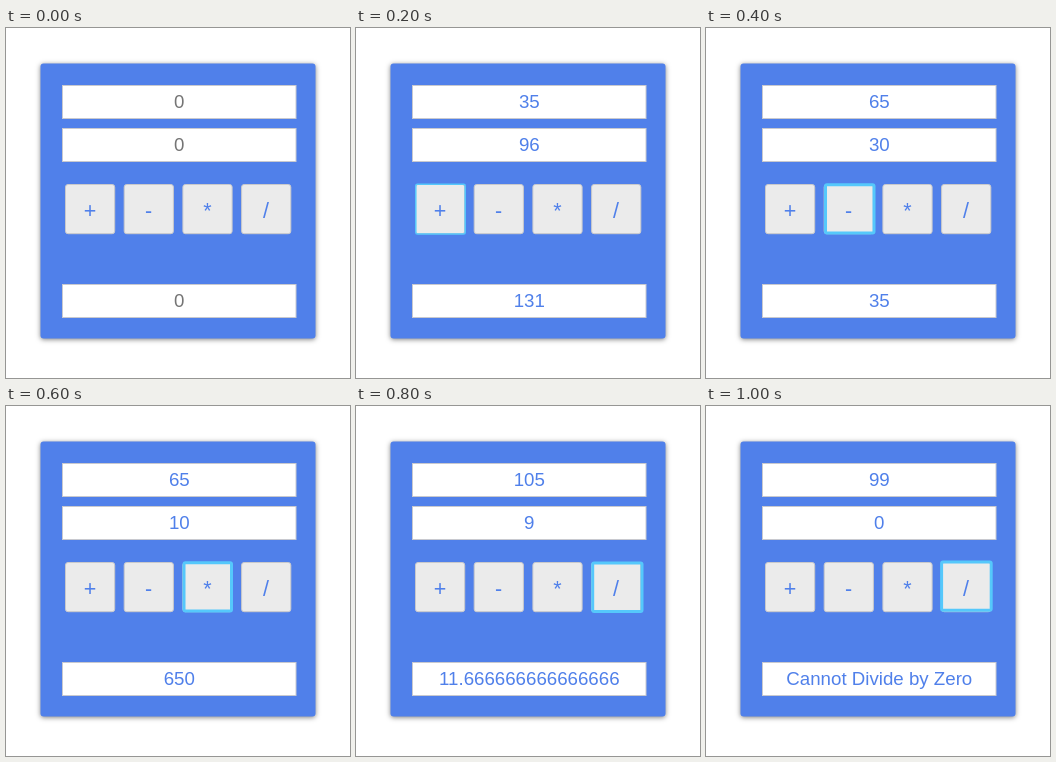
Recreate the animation shown at these times as an HTML page. Size 344 by 350 pixels, loop 1.2 s.

```html
<!DOCTYPE html>
<html lang="en">
<head>
<meta charset="utf-8">
<title>Calculator</title>
<style>
html, body { margin: 0; width: 100%; height: 100%; overflow: hidden; background: #fff; }
svg { display: block; width: 100vw; height: 100vh; }
text { font-family: "Liberation Sans", Arial, sans-serif; text-anchor: middle; fill: #5080ea; }
.field { font-size: 18.7px; }
.key { font-size: 21.5px; }
.card { filter: drop-shadow(0 1px 2.5px rgba(0, 0, 0, .5)); }
</style>
</head>
<body>
<svg id="stage" viewBox="0 0 344 350">
  <rect width="344" height="350" fill="#fff"/>
  <rect class="card" x="34.5" y="35.5" width="275" height="275" rx="3" fill="#5080ea"/>
</svg>
<script>
const stage = document.getElementById("stage");
const STEP = 200;

// operands, result, and focus ring: x, y, width, height, thickness
const states = [
  { values: ["0", "0", "0"] },
  { values: ["35", "96", "131"], ring: [59.8, 156.3, 49.4, 49.8, 1.5] },
  { values: ["65", "30", "35"], ring: [119.5, 156.7, 48.5, 48.3, 3] },
  { values: ["65", "10", "650"], ring: [178, 156.7, 47.5, 48.3, 3] },
  { values: ["105", "9", "11.666666666666666"], ring: [236.7, 157, 49.3, 48.5, 3] },
  { values: ["99", "0", "Cannot Divide by Zero"], ring: [235.6, 156, 49.6, 48.2, 3] }
];

function add(tag, attrs, content = "") {
  const node = document.createElementNS("http://www.w3.org/2000/svg", tag);
  for (const name in attrs) node.setAttribute(name, attrs[name]);
  node.textContent = content;
  return stage.appendChild(node);
}

const fields = [57, 100, 256].map(y => {
  add("rect", { x: 56.5, y: y + .5, width: 233.5, height: 33, fill: "#fff", stroke: "#c8c9cf" });
  return add("text", { class: "field", x: 173.3, y: y + 23.4 });
});

["+", "-", "*", "/"].forEach((sign, i) => {
  const x = 59 + i * 58.7;
  add("rect", { x: x + .5, y: 156.5, width: 49.2, height: 49.2, rx: 2.5, fill: "#ebebeb", stroke: "#c9c9cb" });
  add("text", { class: "key", x: x + 25, y: 190 }, sign);
});

const ring = add("rect", { rx: 1.5, fill: "none", stroke: "#55c8fb" });

function render(time) {
  const { values, ring: box } = states[Math.floor(time / STEP) % states.length];
  fields.forEach((field, i) => {
    field.textContent = values[i];
    field.style.fill = box ? "#5080ea" : "#757575";
  });
  ring.style.display = box ? "" : "none";
  if (box) ["x", "y", "width", "height", "stroke-width"].forEach((name, i) => ring.setAttribute(name, box[i]));
}

const start = performance.now();
function tick() {
  render(performance.now() - start);
  requestAnimationFrame(tick);
}
tick();
</script>
</body>
</html>
```
